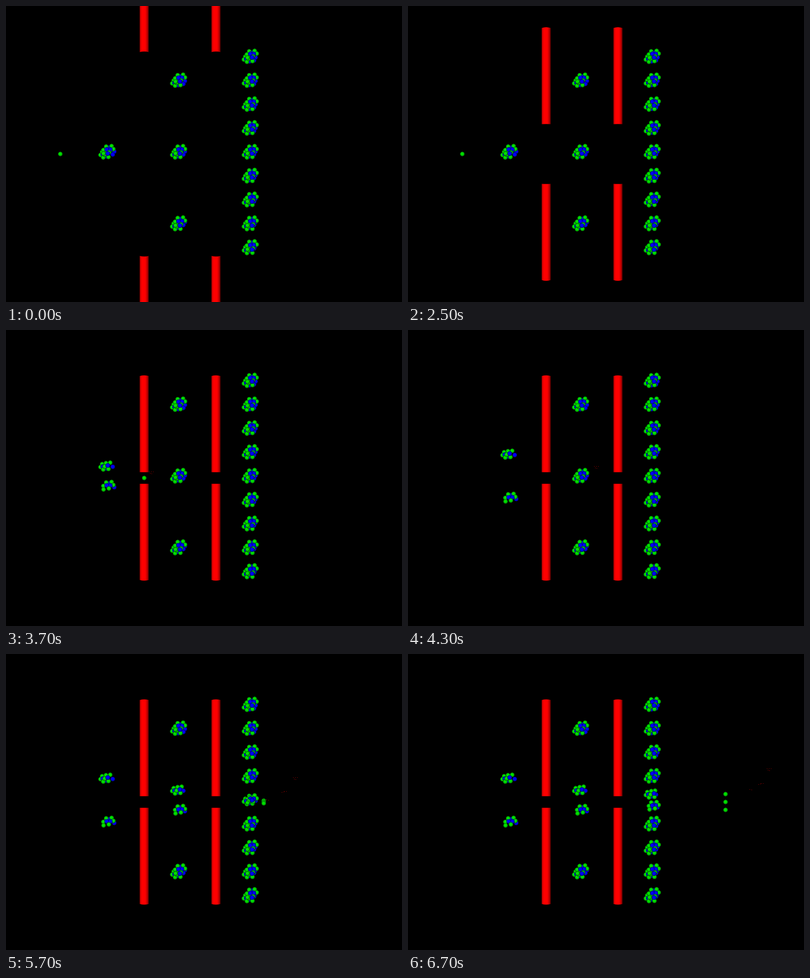
An HTML page with a canvas for the animation above (8.7 s loop, 800 px wide and 600 px high).

```html
<!DOCTYPE html>
<html lang="en">
<head>
<meta charset="utf-8">
<title>Chain reaction</title>
<style>
  html, body { margin: 0; width: 100%; height: 100%; overflow: hidden; background: #000; }
  canvas { display: block; }
</style>
</head>
<body>
<canvas id="stage" width="800" height="600"></canvas>
<script>
const ctx = document.getElementById('stage').getContext('2d');
const LOOP = 8700, HOLD = 2000, STEP = 100, LAST_STEP = 48;
const UNIT = 48.3, CAMERA = 900, RADIUS = 4.8;
const FISSION_STEPS = [12, 24, 36];

// Nucleons of each half: x, y from the nucleus centre, z towards the viewer.
const upperHalf = {
  green: [[9, -12, 3], [-2, -11, 3], [13, -6, 5], [-7, -4, 6], [-6, 3, 9], [5, 1, 10]],
  blue: [[0, -5, 7], [7, -5, 6], [3, -9, 0], [12, -1, -8], [2, 0, -4]]
};
const lowerHalf = {
  green: [[-13, 6, 5], [-10, 0, 4], [-2, -2, 5], [6, -3, 2], [-7, 11, 7], [4, 10, 9], [-4, 5, 8]],
  blue: [[3, 3, 11], [-8, 5, 6], [9, 5, -8], [-1, 9, 2]]
};

const gammas = [
  { x: 206, vx: 14.52, vy: -1.84, dots: [[-4, -2], [-2, 1], [0, -2], [1, 2], [4, -2]] },
  { x: 351, vx: 15.1, vy: -1.53, dots: [[-5, 1], [-1, 0], [0, -1], [4, -1]] },
  { x: 495, vx: 16.4, vy: -2.08, dots: [[-2, -1], [2, 0]] }
];

function makeBall(stops) {
  const sprite = document.createElement('canvas');
  sprite.width = sprite.height = 40;
  const c = sprite.getContext('2d');
  const shade = c.createRadialGradient(18, 17, 0, 20, 20, 20);
  stops.forEach(([at, color]) => shade.addColorStop(at, color));
  c.fillStyle = shade;
  c.arc(20, 20, 19.5, 0, 7);
  c.fill();
  return sprite;
}

const sprites = {
  green: makeBall([[0, '#00f000'], [0.5, '#00d800'], [0.8, '#009800'], [1, '#003800']]),
  blue: makeBall([[0, '#0000ff'], [0.55, '#0000ee'], [0.85, '#0000a0'], [1, '#000040']])
};

function drawBall(color, x, y) {
  ctx.drawImage(sprites[color], x - RADIUS, y - RADIUS, 2 * RADIUS, 2 * RADIUS);
}

function drawNucleus(cx, cy, split) {
  const balls = [];
  for (const [half, shift] of [[upperHalf, split], [lowerHalf, -split]])
    for (const color in half)
      for (const [x, y, z] of half[color]) {
        const py = cy + y + shift;
        balls.push({
          color, z,
          x: cx + x + (cx - 400) * z / CAMERA,
          y: py + (py - 300) * z / CAMERA
        });
      }
  balls.sort((a, b) => a.z - b.z);
  balls.forEach(b => drawBall(b.color, b.x, b.y));
}

function drawRod(x, top, bottom) {
  const shade = ctx.createLinearGradient(x - 9, 0, x + 9.5, 0);
  shade.addColorStop(0, '#900000');
  shade.addColorStop(0.16, '#f00000');
  shade.addColorStop(0.3, '#ff0000');
  shade.addColorStop(0.62, '#fb0000');
  shade.addColorStop(0.85, '#b80000');
  shade.addColorStop(1, '#480000');
  const bulge = y => (y - 300) * 0.013;
  ctx.fillStyle = shade;
  ctx.beginPath();
  ctx.moveTo(x - 9, top);
  ctx.quadraticCurveTo(x, top + bulge(top), x + 9.5, top);
  ctx.lineTo(x + 9.5, bottom);
  ctx.quadraticCurveTo(x, bottom + bulge(bottom), x - 9, bottom);
  ctx.fill();
}

function drawGammas(step) {
  ctx.fillStyle = '#b80000';
  gammas.forEach((g, i) => {
    const age = step - FISSION_STEPS[i];
    if (age <= 0) return;
    for (const [dx, dy] of g.dots)
      ctx.fillRect(Math.round(g.x + g.vx * age + dx), Math.round(300 + g.vy * age + dy), 1, 1);
  });
}

function drawNeutrons(step) {
  const x = step < 12
    ? Math.min(206.8, 109.7 + Math.max(0, step - 7) * UNIT / 2)
    : 206.8 + (step - 12) * UNIT / 4;
  const spread = Math.max(0, step - 36) * 4 / 3;
  const offsets = spread ? [-spread, 0, spread] : [0];
  offsets.forEach(dy => drawBall('green', x, 300 + dy));
}

function draw(step) {
  ctx.fillStyle = '#000';
  ctx.fillRect(0, 0, 800, 600);
  drawGammas(step);

  const inner = 93.5 + Math.min(step, 8) * 24.35;
  for (const x of [279, 424]) {
    drawRod(x, inner - 195, inner);
    drawRod(x, 600 - inner, 795 - inner);
  }

  drawNeutrons(step);
  // Columns of 1, 3 and 9 nuclei; the middle one of each splits in turn.
  [1, 3, 9].forEach((count, column) => {
    const gap = [0, 144.3, 48.1][column];
    const travel = [48, 24, 16][column];
    const progress = Math.min(1, Math.max(0, (step - FISSION_STEPS[column]) / 12));
    const middle = (count - 1) / 2;
    for (let i = 0; i < count; i++)
      drawNucleus(205 + column * 144, 296 + (i - middle) * gap, i === middle ? travel * progress : 0);
  });
}

function frame() {
  const time = performance.now() % LOOP;
  draw(time < HOLD ? 0 : Math.min(LAST_STEP, Math.floor((time - HOLD) / STEP) + 1));
  requestAnimationFrame(frame);
}
frame();
</script>
</body>
</html>
```
